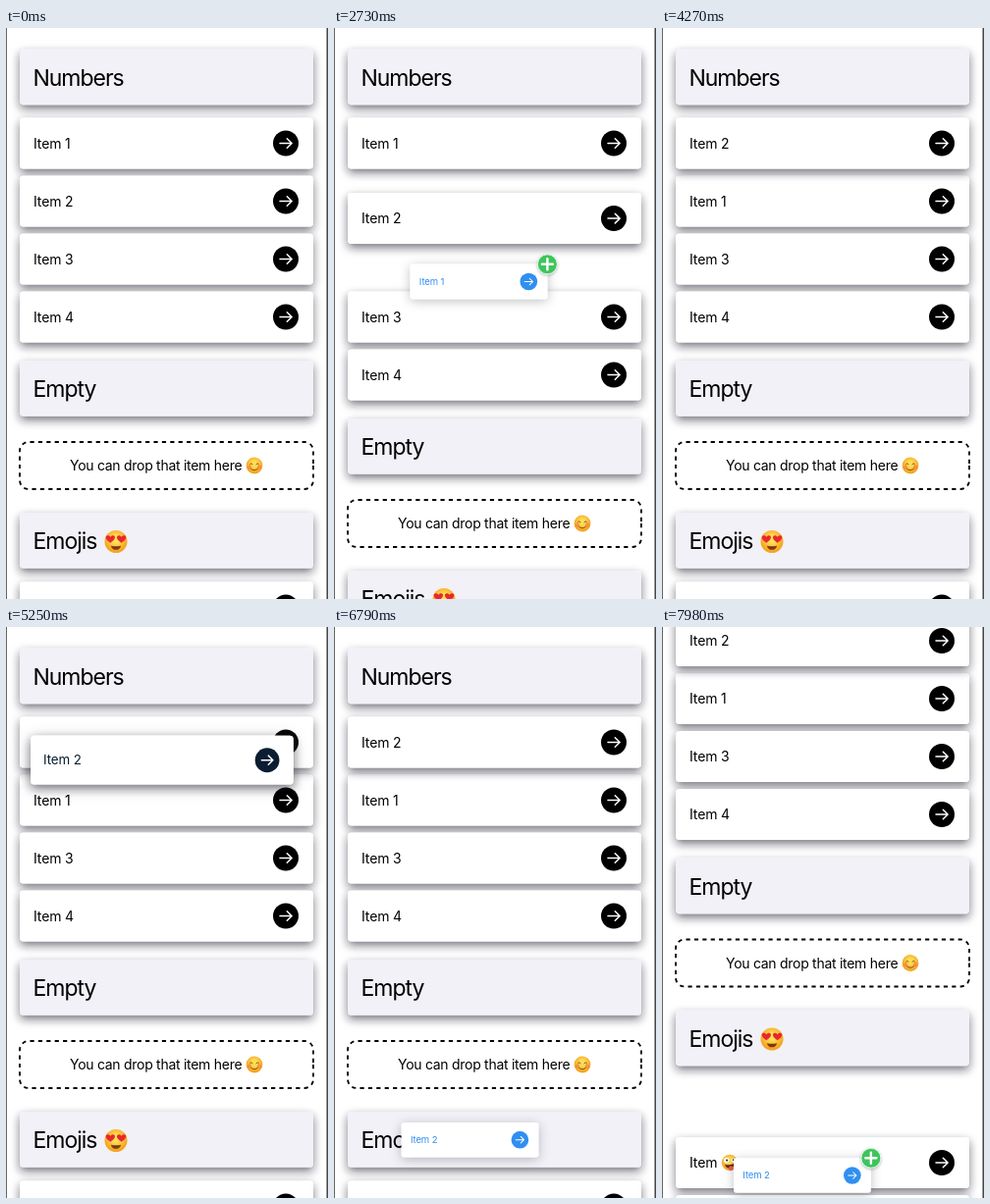
Recreate the animation shown at these times as an HTML page. Size 328 by 582 pixels, loop 8 s.

```html
<!DOCTYPE html>
<html lang="en">
<head>
<meta charset="utf-8">
<title>Drag and drop list</title>
<style>
html, body { margin: 0; width: 100%; height: 100%; overflow: hidden; background: #fff; }
svg { display: block; width: 100vw; height: 100vh; }
text { font-family: Inter, Roboto, sans-serif; }
.title { font-size: 23px; letter-spacing: -.045em; }
.body { font-size: 14px; letter-spacing: -.02em; }
.item { font-size: 14px; letter-spacing: -.01em; }
</style>
</head>
<body>
<svg id="stage" viewBox="0 0 328 582">
  <defs>
    <filter id="shadow" x="-20%" y="-60%" width="140%" height="240%">
      <feDropShadow dx="0" dy="4" stdDeviation="5" flood-color="#22222e" flood-opacity=".6"/>
    </filter>
    <filter id="soft" x="-30%" y="-80%" width="160%" height="280%">
      <feDropShadow dx="0" dy="3" stdDeviation="8" flood-color="#000" flood-opacity=".25"/>
    </filter>
    <filter id="badge" x="-50%" y="-50%" width="200%" height="200%">
      <feDropShadow dx="0" dy="1" stdDeviation="1.5" flood-opacity=".3"/>
    </filter>
    <radialGradient id="face" cy=".4">
      <stop offset=".3" stop-color="#ffdf55"/>
      <stop offset="1" stop-color="#f5a623"/>
    </radialGradient>
  </defs>
</svg>
<script>
const LOOP = 8000, PITCH = 59, CX = 163.5, TOP = 117.5;
const stage = document.getElementById('stage');

function el(parent, tag, attrs = {}, content) {
  const node = document.createElementNS('http://www.w3.org/2000/svg', tag);
  set(node, attrs);
  if (content) node.textContent = content;
  parent.appendChild(node);
  return node;
}
function set(node, attrs) {
  for (const key in attrs) node.setAttribute(key, attrs[key]);
}
const mix = (a, b, k) => a + (b - a) * k;
const clamp = v => Math.min(1, Math.max(0, v));
const ease = p => p < .5 ? 4 * p ** 3 : 1 - 4 * (1 - p) ** 3;
const linear = p => p;
const ramp = (t, from, to, fn = ease) => fn(clamp((t - from) / (to - from)));
const smooth = p => p * p * (3 - 2 * p);

// Value of a keyed path of [time, value] points
function track(t, keys, fn = smooth) {
  if (t <= keys[0][0]) return keys[0][1];
  for (let i = 1; i < keys.length; i++) {
    const [t0, a] = keys[i - 1], [t1, b] = keys[i];
    if (t < t1) return mix(a, b, fn((t - t0) / (t1 - t0)));
  }
  return keys[keys.length - 1][1];
}

function arrow(parent, x) {
  const g = el(parent, 'g', { transform: `translate(${x} 0)` });
  const disc = el(g, 'circle', { r: 13 });
  el(g, 'path', {
    d: 'M-6 0H6M1.3-4.8 6.1 0 1.3 4.8', fill: 'none', stroke: '#fff',
    'stroke-width': 1.5, 'stroke-linecap': 'round', 'stroke-linejoin': 'round'
  });
  return { g, disc };
}

const heart = x => `M${x} 1C${x - 7}-3 ${x - 3.5}-7.5 ${x}-4.2C${x + 3.5}-7.5 ${x + 7}-3 ${x} 1Z`;

function emoji(parent, kind, x, y, r) {
  const g = el(parent, 'g', { transform: `translate(${x} ${y}) scale(${r / 10})` });
  const line = { fill: 'none', stroke: '#7a4516', 'stroke-width': 1.1, 'stroke-linecap': 'round' };
  el(g, 'circle', { r: 10, fill: 'url(#face)' });
  if (kind === 'love') {
    el(g, 'path', { d: heart(-4.9) + heart(4.9), fill: '#e8272e' });
    el(g, 'path', { d: 'M-4.5 3.6Q0 4.6 4.5 3.6Q3.6 7.2 0 7.2T-4.5 3.6Z', fill: '#7a3a16' });
  } else if (kind === 'smile') {
    for (const s of [-1, 1]) el(g, 'circle', { cx: s * 6, cy: 2, r: 2.6, fill: '#f4744a', opacity: .6 });
    el(g, 'path', { d: 'M-5.5-1.5Q-4-4.2-2.2-1.5M2.2-1.5Q4-4.2 5.5-1.5M-4 4Q0 7.5 4 4', ...line });
  } else {
    el(g, 'circle', { cx: -4, cy: -3, r: 3.4, fill: '#fff' });
    el(g, 'circle', { cx: 4.5, cy: -3, r: 2.6, fill: '#fff' });
    el(g, 'circle', { cx: -3.5, cy: -3, r: 1.4, fill: '#4a2a12' });
    el(g, 'circle', { cx: 4.5, cy: -3.5, r: 1.1, fill: '#4a2a12' });
    el(g, 'path', { d: 'M-6 2Q0 4 6 1Q5 7 0 7T-6 2Z', fill: '#6b2a12' });
    el(g, 'rect', { x: -1, y: 4, width: 5, height: 6, rx: 2.5, fill: '#f0596a' });
  }
}

// Rows are drawn around their vertical centre
function card(height, fill) {
  const g = el(stage, 'g');
  el(g, 'rect', { x: 14, y: -height / 2, width: 299, height, rx: 4, fill, filter: 'url(#shadow)' });
  return g;
}
function header(label, y) {
  const g = card(56.5, '#f2f1f8');
  el(g, 'text', { x: 27.5, y: 8.5, class: 'title' }, label);
  return { g, y };
}
function item(label, y) {
  const g = card(52, '#fff');
  el(g, 'text', { x: 28, y: 5, class: 'item' }, label);
  arrow(g, 285);
  return { g, y };
}
function dropZone(y) {
  const g = el(stage, 'g');
  // The dashes run clockwise from the middle of the right side
  el(g, 'path', {
    d: 'M313 0V15a9 9 0 0 1-9 9H23a9 9 0 0 1-9-9V-15a9 9 0 0 1 9-9H304a9 9 0 0 1 9 9Z',
    fill: '#fff', stroke: '#000', 'stroke-width': 1.8, 'stroke-dasharray': '4.2 4.2'
  });
  el(g, 'text', { x: 65, y: 5, class: 'body' }, 'You can drop that item here');
  emoji(g, 'smile', 253, 0, 8.4);
  return { g, y };
}

el(stage, 'rect', { width: 328, height: 582, fill: '#fff' });
const numbers = header('Numbers', 50);
const items = [1, 2, 3, 4].map((n, i) => item('Item ' + n, TOP + i * PITCH));
const empty = header('Empty', 367.5);
const zone = dropZone(446);
const emojis = header('Emojis', 522.5);
emoji(emojis.g, 'love', 112, 1, 11.5);
const faces = [item('Item', 590.5), item('Item', 590.5 + PITCH)];
emoji(faces[0].g, 'wild', 69, 0, 8.2);
emoji(faces[1].g, 'smile', 69, 0, 8.2);

// Lifted copy of an item
const platter = el(stage, 'rect', { x: -10, y: 90, width: 348, height: 62, fill: '#fff', filter: 'url(#soft)' });
const ghost = el(stage, 'g');
const softBox = el(ghost, 'rect', { y: -26, height: 52, rx: 4, fill: '#fff', filter: 'url(#soft)' });
const hardBox = el(ghost, 'rect', { y: -26, height: 52, rx: 4, fill: '#fff', filter: 'url(#shadow)' });
const ghostText = el(ghost, 'text', { y: 5, class: 'item' });
const ghostArrow = arrow(ghost, 0);
const plus = el(stage, 'g');
el(plus, 'circle', { r: 10, fill: '#3cc55c', stroke: '#e4f5e7', 'stroke-width': 1, filter: 'url(#badge)' });
el(plus, 'path', { d: 'M-5.5 0H5.5M0-5.5V5.5', stroke: '#fff', 'stroke-width': 2.4, 'stroke-linecap': 'round' });

el(stage, 'rect', { width: 1, height: 582, fill: '#666' });
el(stage, 'rect', { x: 326.5, width: 1.5, height: 582, fill: '#444' });

const drags = [
  {
    label: 'Item 1', start: 1610, end: 3640,
    x: [[1990, CX], [2300, 150], [2730, 147.5], [3290, 147.5], [3640, CX]],
    y: [[1990, TOP], [2400, 196], [2730, 258.5], [2870, 262], [3290, 262], [3640, TOP + PITCH]],
    plus: [[2330, 0], [2450, 1], [3290, 1], [3390, 0]],
    alpha: [[3300, 1], [3640, 0]]
  },
  {
    label: 'Item 2', start: 4760, end: LOOP,
    x: [[5140, CX], [5450, 148], [5880, 133.5], [6500, 136], [7210, 143]],
    y: [[5140, TOP], [5530, 210], [5900, 484], [6400, 490], [7210, 559]],
    plus: [[5480, 0], [5600, 1], [5820, 1], [5940, 0], [7200, 0], [7390, 1]],
    alpha: [[5500, 1], [5700, .88], [6000, .88], [6250, 1]]
  }
];

function place(row, y) {
  row.g.setAttribute('transform', `translate(0 ${y})`);
}

function drawDrag(t) {
  const drag = drags.find(d => t >= d.start && t < d.end);
  for (const node of [platter, ghost, plus]) node.style.display = drag ? '' : 'none';
  if (!drag) return;

  const age = t - drag.start;
  const lift = ramp(age, 0, 210);
  const small = ramp(age, 380, 680);
  const scale = mix(1 + .026 * lift, .68, small);
  const width = mix(299, 205.5, small);
  const x = track(t, drag.x), y = track(t, drag.y);
  const tint = `rgb(${mix(0, 48, small)},${mix(0, 143, small)},${mix(0, 240, small)})`;

  set(platter, { opacity: lift * (1 - ramp(age, 380, 520)) });
  set(ghost, { transform: `translate(${x} ${y}) scale(${scale})`, opacity: track(t, drag.alpha) });
  for (const box of [softBox, hardBox]) set(box, { x: -width / 2, width });
  set(hardBox, { opacity: 1 - small });
  ghostText.textContent = drag.label;
  set(ghostText, { x: -width / 2 + 13.5, fill: tint });
  set(ghostArrow.g, { transform: `translate(${width / 2 - 28} 0)` });
  set(ghostArrow.disc, { fill: tint });

  const p = track(t, drag.plus, linear);
  set(plus, {
    transform: `translate(${x + width * scale / 2} ${y - 26 * scale}) scale(${p})`,
    opacity: p
  });
}

function render(t) {
  const scroll = track(t, [[7170, 0], [7210, 8], [7350, 31.5], [7980, 103.5]], linear);
  const open1 = ramp(t, 2140, 2400), drop = ramp(t, 3290, 3690);
  const open2 = ramp(t, 5280, 5520);
  const tail = open1 - drop + open2 - ramp(t, 5640, 5966);
  const moves = [
    drop + open2 - ramp(t, 5540, 5800),
    open1 - ramp(t, 2537, 2872) - drop,
    open1 - drop + open2 - ramp(t, 5580, 5870),
    tail
  ];
  place(numbers, numbers.y - scroll);
  items.forEach((row, i) => place(row, row.y + moves[i] * PITCH - scroll));
  for (const row of [empty, zone, emojis]) place(row, row.y + tail * PITCH - scroll);
  const gap = tail + ramp(t, 7200, 7513);
  for (const row of faces) place(row, row.y + gap * PITCH - scroll);
  drawDrag(t);
}

const begin = performance.now();
function tick() {
  render((performance.now() - begin) % LOOP);
  requestAnimationFrame(tick);
}
render(0);
requestAnimationFrame(tick);
</script>
</body>
</html>
```
